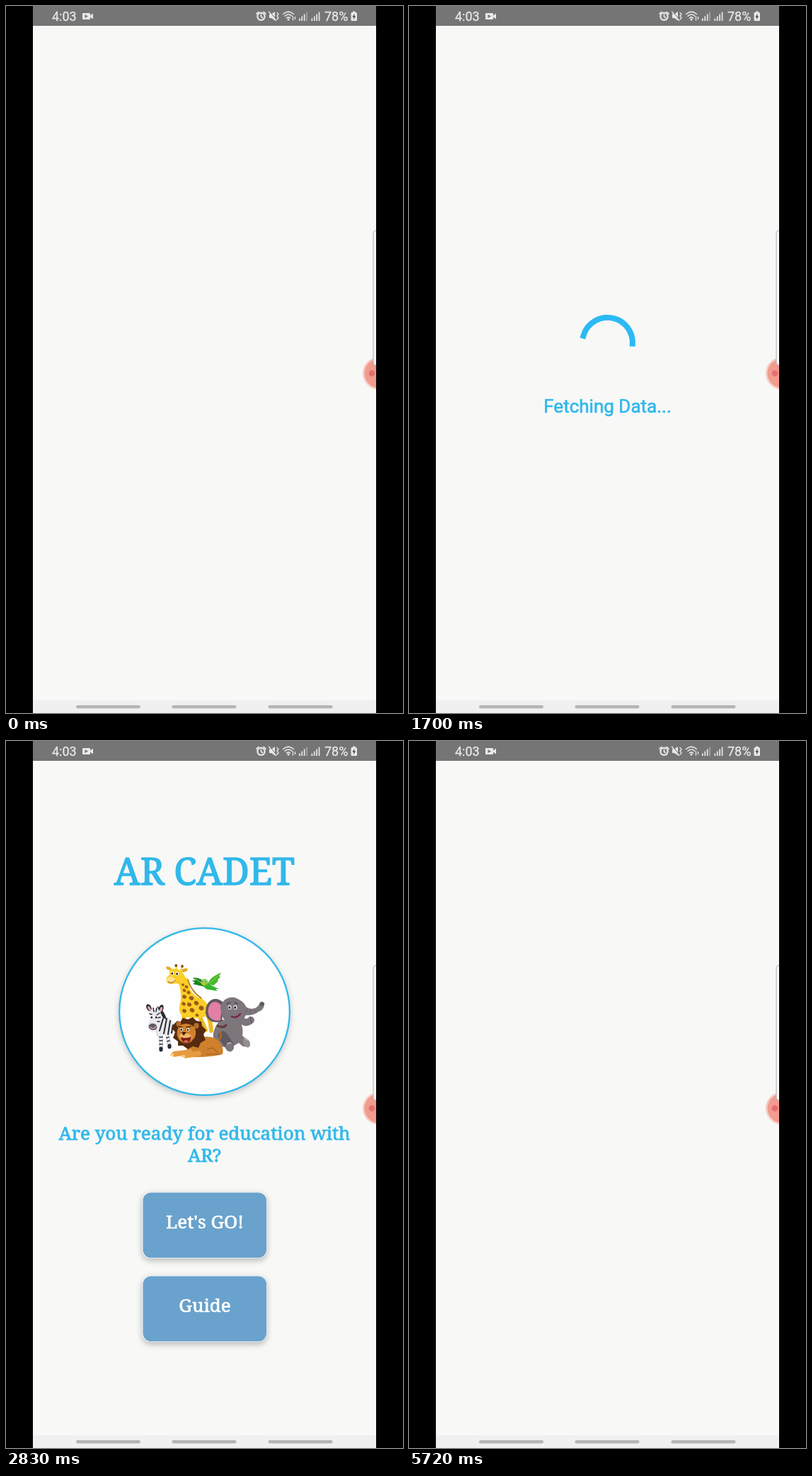
Recreate the animation shown at these times as an HTML page with a canvas. Size 561 px wide and 998 px high, loop 5810 ms.

```html
<!DOCTYPE html>
<html lang="en">
<head>
<meta charset="utf-8">
<title>AR learning app</title>
<style>
html, body { margin: 0; width: 100%; height: 100%; overflow: hidden; background: #000; }
canvas { display: block; width: 561px; height: 998px; }
</style>
</head>
<body>
<canvas id="stage" width="561" height="998"></canvas>
<script>
const ctx = document.getElementById('stage').getContext('2d');
const LOOP = 5810, STEP = 33.27;
const LOADER_AT = 625, HOME_AT = 2385, PRESS_AT = 4490, RELEASE_AT = 4890, LEAVE_AT = 5560;
const BLUE = '#31b8ea', PAPER = '#f8f8f7';
const SERIF = '"Noto Serif", serif', SANS = 'Roboto, sans-serif';
const rad = d => d * Math.PI / 180;

function rect(x, y, w, h, color, r = 0) {
  ctx.fillStyle = color;
  ctx.beginPath();
  ctx.roundRect(x, y, w, h, r);
  ctx.fill();
}
function oval(x, y, rx, ry, color, turn = 0) {
  ctx.fillStyle = color;
  ctx.beginPath();
  ctx.ellipse(x, y, rx, ry, rad(turn), 0, Math.PI * 2);
  ctx.fill();
}
function shape(d, color) {
  ctx.fillStyle = color;
  ctx.fill(new Path2D(d));
}
function line(d, color, width = 1, cap = 'round') {
  ctx.strokeStyle = color;
  ctx.lineWidth = width;
  ctx.lineCap = cap;
  ctx.lineJoin = 'round';
  ctx.stroke(new Path2D(d));
}
function text(s, x, y, size, color, family, align = 'center', weight = 0) {
  ctx.font = size + 'px ' + family;
  ctx.textAlign = align;
  ctx.fillStyle = ctx.strokeStyle = color;
  ctx.fillText(s, x, y);
  if (weight) {
    ctx.lineWidth = weight;
    ctx.lineJoin = 'round';
    ctx.strokeText(s, x, y);
  }
}
function withShadow(blur, dy, alpha, draw) {
  ctx.save();
  ctx.shadowColor = `rgba(0,0,0,${alpha})`;
  ctx.shadowBlur = blur;
  ctx.shadowOffsetY = dy;
  draw();
  ctx.restore();
}

function statusBar() {
  const c = '#e9e9e9', bg = '#757575';
  rect(38, 0, 485, 28, bg);
  text('4:03', 65, 21, 18, c, SANS, 'left', 0.3);
  text('78%', 450, 21, 18, c, SANS, 'left', 0.3);
  // camera
  rect(108, 10, 11, 9, c, 1);
  shape('M119 13.5 L123 10.5 V18.5 L119 15.5Z', c);
  shape('M111.5 12 L116 14.5 L111.5 17Z', bg);
  // alarm
  oval(360.5, 14.8, 6.2, 6.2, c);
  oval(360.5, 14.8, 4, 4, bg);
  line('M360.5 12 V15 L362.5 16.5 M354 11 L357 8.3 M367 11 L364 8.3', c, 1.7);
  // muted speaker
  shape('M372 11.5 H375 L380 8 V20.5 L375 17 H372Z', c);
  line('M372.5 8 L382 20', bg, 1.6);
  line('M371.5 8 L381.5 20.5', c, 1.3);
  line('M383 9.5 L385 11.5 L383 14 L385 16.5 L383 19', c, 1.4);
  // wifi
  line('M391.5 11.5 Q399 4.8 406.5 11.5 M394 14.3 Q399 9.8 404 14.3 M396.5 17 Q399 14.8 401.5 17', c, 1.5);
  oval(399, 19, 1.5, 1.5, c);
  line('M405.5 15 V20 M408.5 18.5 V15.5', c, 1.3);
  for (const x of [414, 431.5])
    for (let i = 0; i < 4; i++) rect(x + i * 3.4, 17.5 - i * 3, 1.7, 3.5 + i * 3, i == 3 && x < 430 ? '#a5a5a5' : c);
  // battery
  rect(487.5, 9, 8.5, 12, c, 1.5);
  rect(490, 7.5, 3.5, 2, c);
  shape('M492.8 10.5 L489.3 15.6 H491.5 L490.7 19.5 L494.3 14.2 H492Z', '#444');
}

function edges() {
  ctx.save();
  ctx.beginPath();
  ctx.rect(38, 0, 485, 998);
  ctx.clip();
  oval(527, 518.5, 23, 23, '#f5cdc4');
  oval(527, 518.5, 20.5, 20.5, '#f29b8e');
  oval(517, 518.5, 4.3, 4.3, '#e46f6f');
  rect(518.5, 316, 12, 192, '#b9b9b9', 5);
  rect(519.7, 317.2, 12, 189.6, '#f7f7f7', 4);
  ctx.restore();
}

function spinner(n) {
  // phase counts sweep cycles, turn is the rotation of the whole ring
  const late = n > 51;
  const k = late ? (n - 51) / 20 : (n - 28) / 23;
  const phase = late ? 3.653 + 2.258 * k : 0.376 + 3.277 * k;
  const turn = late ? 843.5 + 486.5 * k : 146.6 + 696.9 * k;
  const p = phase - Math.floor(phase);
  const tail = p < 0.5 ? 0 : ease(p, 0.5, 0.7, 0.6, 1);
  const head = p > 0.5 ? 1 : ease(p, 0, 0.2, 0.1, 0.5);
  const base = turn + 90 * p - 90;
  ctx.strokeStyle = '#2bbaf3';
  ctx.lineWidth = 8;
  ctx.lineCap = 'square';
  ctx.beginPath();
  ctx.arc(280.5, 475.2, 35.4, rad(base + 270 * tail), rad(base + 270 * head));
  ctx.stroke();
}
// S-curve along a cubic with x control values a..d and y values 0, 0, 1, 1
function ease(x, a, b, c, d) {
  let lo = 0, hi = 1;
  for (let i = 0; i < 24; i++) {
    const u = (lo + hi) / 2, v = 1 - u;
    const at = a * v ** 3 + 3 * b * u * v * v + 3 * c * u * u * v + d * u ** 3;
    if (at < x) lo = u; else hi = u;
  }
  return lo * lo * (3 - 2 * lo);
}

function eye(x, y, r) {
  oval(x, y, r, r * 1.2, '#fff');
  oval(x - 0.2, y + 0.2, r * 0.6, r * 0.75, '#222');
}

function giraffe() {
  const y = '#fbcd26', b = '#9c5c18';
  line('M279 378 Q289 388 290 409 M272 385 L282 408 M252 380 L251 396', '#eebb20', 6);
  shape('M243 339 Q248 352 247 366 Q242 382 249 388 Q270 395 286 387 Q288 371 277 364 Q266 361 261 352 L256 334Z', y);
  line('M257 337 Q262 354 276 363', '#b87d1c', 1.8);
  for (const [x, yy, r] of [[250, 344, 2], [255, 347, 2.5], [252, 352, 2.5], [258, 355, 2.6], [252, 361, 3], [262, 363, 3.3],
    [251, 371, 2.8], [259, 372, 3.2], [269, 370, 3.4], [252, 381, 3], [263, 380, 3.4], [276, 377, 3.6], [270, 387, 2.5], [284, 384, 2.5]])
    oval(x, yy, r, r * 0.85, b, 30);
  line('M241 324 L240.5 318 M247 324 L249 319', y, 2);
  oval(240.3, 317, 1.9, 1.9, '#84481a');
  oval(249, 318, 1.9, 1.9, '#84481a');
  oval(252.5, 323.5, 4.5, 2.3, '#e8a825', -20);
  oval(230, 321, 4, 2.2, '#e8a825', 25);
  shape('M231 323 Q240 319 249 326 L256 338 Q250 345 240 342 Q228 346 226.5 338 Q226 333 231 330Z', y);
  oval(233, 337.5, 6.2, 4.8, '#ffe28a', 10);
  line('M229 339.5 Q234 344 239 338', '#8a4b18', 1);
  eye(235, 328, 2.2);
  eye(242, 328.5, 2.3);
}

function parrot() {
  const g = '#35b52d', d = '#168322';
  shape('M281 347 L264 343 L267 341 L263 338 L268 338 L264 334 Q277 334 284 343Z', d);
  shape('M285 343 Q288 333 304 327 L301 332 L303 333 L299 337 L300 339 L293 345Z', '#42b82c');
  shape('M278 343 Q284 339 290 345 L301 350 L296 350 L299 353 L288 351 Q281 352 278 343Z', g);
  oval(280.5, 340.5, 5.2, 4.7, '#72d532');
  shape('M276 341 L279 346 L282 342Z', '#f1ad25');
  eye(278.5, 339, 1.4);
  eye(282.6, 339, 1.4);
  line('M267 336 L279 343 M300 331 L288 342', '#a6db3b', 1);
}

function elephant() {
  const g = '#7d767b', d = '#5f5960', pink = '#e27fa5';
  shape('M303 393 Q287 413 296 427 Q313 438 329 426 Q339 412 331 396Z', g);
  shape('M305 396 Q288 400 283 388 Q280 374 288 367 Q297 360 308 370Z', d);
  shape('M303 394 Q290 397 286 386 Q284 376 290 370 Q297 365 305 374Z', pink);
  shape('M303 374 Q309 360 323 362 Q335 366 340 376 Q351 381 357 373 Q359 367 363 368 L365 372 Q364 380 357 382 Q350 388 339 387 Q333 399 318 399 Q303 395 303 374Z', g);
  oval(362, 371.5, 3.2, 2.4, d, -25);
  line('M333 394 Q339 400 346 394', g, 10);
  line('M345 389 L347 399', '#55505a', 1);
  line('M306 416 L315 429', d, 13);
  line('M326 416 L337 426', g, 11);
  oval(316, 432, 6, 6.5, g, -25);
  oval(340, 426, 4.5, 7, '#948d92', -25);
  line('M338 420 L342 422 M313 427 L318 426', '#c8c1c5', 1.4);
  line('M319 389 Q326 392 331 385', '#7d2540', 2.4);
  eye(316, 376, 2.5);
  eye(324, 376, 2.5);
  line('M312 371 L317 369 M323 369 L327 371', '#3d383f', 1.2);
  line('M341 378 L339 384 M346 380 L345 385 M351 379 L352 383', '#645e64', 0.8);
  line('M299 402 Q307 406 311 401', '#63383c', 3);
}

function zebra() {
  const w = '#e9e8ec', k = '#2c2b33';
  line('M219 413 L219 435 M228 414 L231 431 M214 406 L216 415', '#b9b7bf', 5.5);
  line('M219 413 L219 435 M228 414 L231 431 M214 406 L216 415', w, 4);
  shape('M211 389 Q222 384 233 393 Q243 402 238 413 Q224 419 214 411Z', w);
  shape('M213 374 Q224 380 227 393 L222 391Z', k);
  oval(202, 376.5, 3.3, 5.5, k, -28);
  oval(202.5, 377.5, 1.8, 3.6, '#e4a5b5', -28);
  oval(219, 378, 3.3, 6, k, 18);
  oval(219, 379, 1.8, 3.8, '#e4a5b5', 18);
  shape('M203 382 Q210 372 218 382 Q221 394 215 402 Q209 410 203 406 Q199 402 203 393Z', w);
  oval(207.5, 403.5, 6, 4.8, '#5e5b65', 10);
  line('M204 404 Q208 408 212 403', '#e5a0ab', 1.3);
  line('M208 377 L209 382 M213 377 L212 382 M217 384 L213 387 M218 390 L214 391 M217 396 L214 396 M203 385 L206 386', k, 1.5);
  line('M222 392 L217 409 M227 392 L223 413 M232 395 L229 414 M236 401 L234 412', k, 2);
  line('M217 418 H221 M217 423 H221 M217 428 H221 M227 419 L230 418 M228 424 L231 423', k, 1.5);
  line('M219 434 V436 M231 430 V432', k, 5);
  eye(206, 390, 2.2);
  eye(212.5, 390, 2.2);
}

function lion() {
  const o = '#cf802c', l = '#e59b40', m = '#552a10';
  line('M291 425 Q307 423 303 411', '#b4691f', 2.5);
  shape('M258 427 Q279 412 296 420 Q309 429 306 442 Q292 447 253 446Z', o);
  line('M285 436 Q291 429 299 440 M283 442 H302', '#a55f1d', 1.2);
  line('M238 442 L260 439 M254 444 L272 441', l, 7.5);
  line('M233 443 H236 M249 445 H252', '#fbd08a', 3);
  shape('M238 399 L242 395 L246 397 L250 391 L257 393 L264 390 L269 395 L276 396 L277 402 L283 408 L279 414 L282 422 L275 426 L272 433 L264 431 L257 435 L250 430 L243 430 L243 424 L236 419 L239 411 L234 405Z', m);
  oval(244, 399.5, 3.5, 4, '#b86e27');
  oval(269, 402, 3.7, 4, '#b86e27');
  shape('M244 403 Q256 394 267 405 Q271 416 263 423 Q256 430 247 424 Q238 416 244 403Z', o);
  oval(254, 417.5, 9, 5, '#efb765', 10);
  shape('M247 418 Q255 421 262 417 Q260 428 253 426 Q248 424 247 418Z', '#7a2017');
  oval(254.5, 424, 3, 1.7, '#dc6a62');
  shape('M248 411 L255 411 L251 416Z', '#3a1d10');
  eye(248, 407, 2);
  eye(257, 407.5, 2.1);
  line('M244 403 L249 404 M255 404 L261 403', m, 1.5);
}

function button(y, label, pressed) {
  withShadow(8, 3, 0.27, () => rect(192.5, y - 0.5, 176, 94, '#f4f7f9', 12));
  rect(193.5, y + 0.5, 174.5, 92, pressed ? '#47c340' : '#69a2cc', 11.5);
  text(label, 281, y + 51, 26, pressed ? '#e0f4de' : '#fff', SERIF, 'center', 0.7);
}

function home(pressed) {
  text('AR CADET', 280.5, 203, 52, BLUE, SERIF, 'center', 1.5);
  withShadow(8, 3, 0.2, () => oval(280.5, 382, 121.5, 119, BLUE));
  oval(280.5, 382, 119.2, 116.7, '#fefefe');
  giraffe();
  parrot();
  elephant();
  zebra();
  lion();
  text('Are you ready for education with', 280.5, 563, 26, BLUE, SERIF, 'center', 0.8);
  text('AR?', 280.5, 593.5, 26, BLUE, SERIF, 'center', 0.8);
  button(637, "Let's GO!", pressed);
  button(755, 'Guide', false);
}

function draw(t) {
  const n = Math.floor((t + 4) / STEP);
  rect(0, 0, 561, 998, '#000');
  rect(38, 0, 485, 998, PAPER);
  rect(38, 980, 485, 18, '#f0f0f0');
  for (const x of [99, 234.5, 370.5]) rect(x, 987, 91, 4.5, '#b5b5b5', 2.25);
  statusBar();
  if (t >= LOADER_AT && t < HOME_AT) {
    spinner(n);
    text('Fetching Data...', 280.5, 574, 26, BLUE, SANS, 'center', 0.7);
  } else if (t >= HOME_AT && t < LEAVE_AT) {
    home(t >= PRESS_AT && t < RELEASE_AT);
  }
  edges();
}

const start = performance.now();
function tick() {
  draw((performance.now() - start) % LOOP);
  requestAnimationFrame(tick);
}
tick();
</script>
</body>
</html>
```
